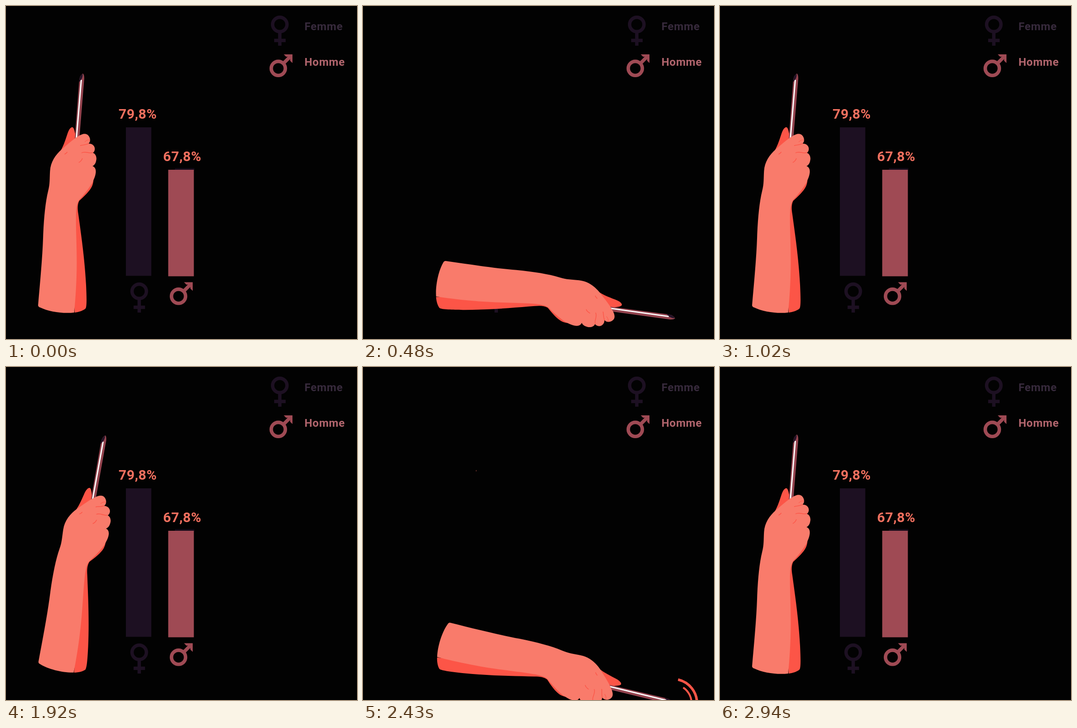
Recreate the animation shown at these times as an HTML page. Size 767 by 730 pixels, loop 3600 ms.

```html
<!DOCTYPE html>
<html lang="fr">
<head>
<meta charset="utf-8">
<title>Femme / Homme</title>
<style>
  html, body { margin: 0; width: 100%; height: 100%; overflow: hidden; background: #020202; }
  svg { display: block; width: 767px; height: 730px; }
  text { font-family: Roboto, Arial, sans-serif; font-weight: 700; }
  .value { font-size: 30px; letter-spacing: .5px; fill: #f1705f; }
  .legend { font-size: 24px; letter-spacing: .7px; }
  .light { fill: #f97b6b; }
  .dark { fill: #fc5547; }
  .line { fill: none; stroke: #fc5547; }
</style>
</head>
<body>
<svg viewBox="0 0 767 730">
  <defs>
    <g id="female" fill="none" stroke="#1d1022" stroke-width="7.4">
      <circle cx="598.3" cy="40.5" r="15.7"/>
      <path d="M598.3 56V87M586 75.5H611"/>
    </g>
    <g id="male" fill="none" stroke="#9f4a54" stroke-width="7.6">
      <circle cx="595" cy="136.8" r="15.4"/>
      <path d="M605.5 126.5L621 111"/>
      <path d="M607 106H626V125L620.8 120V111.2H612Z" fill="#9f4a54" stroke="none"/>
    </g>
  </defs>

  <rect width="767" height="730" fill="#020202"/>

  <!-- chart -->
  <rect x="262" y="266" width="55.5" height="325.5" fill="#1d1022"/>
  <rect x="369" y="355.5" width="42.5" height="5" fill="#150b19"/>
  <rect x="354.5" y="359" width="56" height="233.5" fill="#9f4a54"/>
  <text class="value" x="246" y="247">79,8%</text>
  <text class="value" x="343.3" y="340">67,8%</text>
  <use href="#female" x="-307.2" y="585"/>
  <use href="#male" x="-218" y="499.5"/>

  <!-- swinging arm; the black sheet behind it wipes the chart -->
  <g id="arm">
    <path fill="#020202" d="M161 651.5L146 430L157 290L168 148V40H-460V651.5Z"/>

    <path class="dark" d="M116 323C125 309 129 296 134 281C137 271 142 264 146 266C150 269 150 279 154 292L140 315Z"/>
    <path class="dark" d="M150 672C160 671 170 667 174 663C177 657 176 635 175 612C172 555 164 500 158 456C156 444 156 435 160 427C170 418 183 406 188 395C191 388 191 382 192 374L140 420Z"/>

    <path fill="#94444f" d="M150 294L160 163Q161 152 168 148Q171 150 171 159L160 294Z"/>
    <path d="M153.6 293L164.5 162" stroke="#fff" stroke-width="2.9"/>
    <path fill="#241328" d="M159.8 167Q159.5 154 167.5 148.5Q168 156 164.5 161Z"/>

    <path class="light" d="M70.2 655C75 600 80.2 545 81.3 500C83.2 460 86.2 430 92.2 405C96.2 390 95.2 378 96.2 362C97.2 342 108.4 326 121.5 314.5
      C134 304 146 292.5 158 285.5C167 279.5 175 278 180 284C185 290 185 298 180 302C187 301 194 306 194 313C194 318 192 320 190 322
      C196 324 199 332 197 339C196 345 193 349 189 351C195 353 197 359 196 366C195 375 191 381 189 387
      C180 402 169 415 161 424C155 431 154 440 153 454C152 490 156 540 154 595C153 625 151 650 149 672
      C125 675 93 670 75 661Q69.5 659 70.2 655Z"/>
    <g class="line" stroke-width="1.4">
      <path d="M128 325Q132 323 134 320"/>
      <path d="M162 306C168 304 175 305 181 301"/>
      <path d="M165 322C174 317 182 325 190 321"/>
      <path d="M159 343Q164 341 167 334"/>
      <path d="M172 298Q178 292 183 294" stroke-width="1"/>
    </g>
    <g id="waves" class="line"></g>
  </g>

  <!-- legend -->
  <use href="#female"/>
  <use href="#male"/>
  <text class="legend" x="652.2" y="53" fill="#372a3c">Femme</text>
  <text class="legend" x="652.2" y="131" fill="#b1656d">Homme</text>
</svg>
<script>
  const LOOP = 3600, TICK = 30, MAX_ANGLE = 99;
  const swings = [
    { start: 0, down: 17, up: 17, waves: [9, 13] },
    { start: 63, down: 18, up: 17, waves: [16, 20] }
  ];
  const arm = document.getElementById('arm');
  const waves = document.getElementById('waves');

  function arc(radius, from, to, width) {
    const point = deg => {
      const a = deg * Math.PI / 180;
      return (168.5 + radius * Math.cos(a)).toFixed(2) + ' ' + (148 + radius * Math.sin(a)).toFixed(2);
    };
    return `<path d="M${point(from)}A${radius} ${radius} 0 0 1 ${point(to)}" stroke-width="${width}"/>`;
  }
  waves.innerHTML = arc(53.2, -176, -18, 5.6) + arc(41.4, -155, -33, 4);

  function render(time) {
    const step = Math.floor((time % LOOP) / TICK);
    let angle = 0, showWaves = false;
    for (const { start, down, up, waves: [first, last] } of swings) {
      const k = step - start;
      if (k < 0 || k > down + up) continue;
      angle = MAX_ANGLE * (k <= down ? k / down : (down + up - k) / up);
      showWaves = k >= first && k <= last;
    }
    arm.setAttribute('transform', `rotate(${angle} 171 659.5)`);
    waves.setAttribute('visibility', showWaves ? 'visible' : 'hidden');
  }

  function loop() {
    render(performance.now());
    requestAnimationFrame(loop);
  }
  loop();
</script>
</body>
</html>
```
